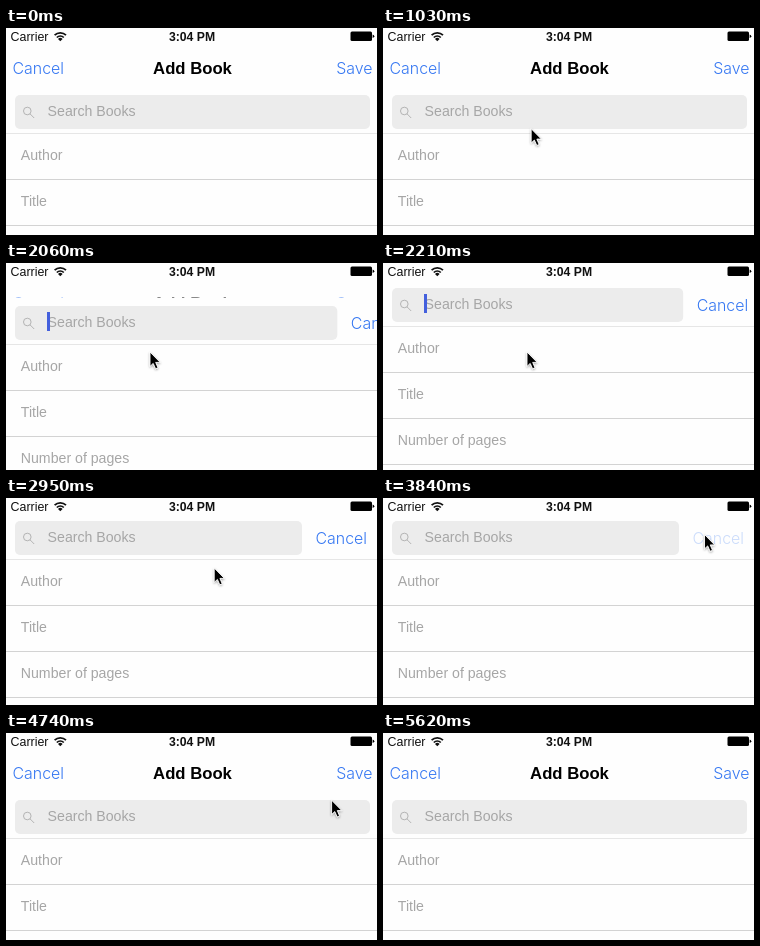
An HTML page that plays this animation: 371x207 px, repeating every 5890 ms.

```html
<!DOCTYPE html>
<html lang="en">
<head>
<meta charset="utf-8">
<title>Add Book</title>
<style>
html, body { margin: 0; width: 100%; height: 100%; overflow: hidden; background: #fefefe; }
svg { display: block; width: 371px; height: 207px; }
text { font-family: "Liberation Sans", Arial, sans-serif; font-size: 14.15px; fill: #a6a6a6; }
.status { font-size: 12.4px; fill: #111; }
.clock { font-size: 12.2px; font-weight: 700; fill: #111; }
.heading { font-size: 16.7px; font-weight: 700; fill: #000; }
.button { font-family: Inter, "Liberation Sans", sans-serif; font-size: 15.9px; font-weight: 300; fill: #3577f2; }
.soft { stroke: #e6e6e6; }
.rule { stroke: #d3d3d3; }
.icon { fill: none; stroke: #adadad; stroke-width: .9; }
.wifi { fill: none; stroke: #111; stroke-width: 1.7; }
</style>
</head>
<body>
<svg viewBox="0 0 371 207">
  <defs>
    <filter id="shade" x="-50%" y="-50%" width="200%" height="200%">
      <feDropShadow dx="0" dy="1" stdDeviation="0.8" flood-opacity="0.35"/>
    </filter>
  </defs>

  <g id="nav">
    <text class="button" x="6.5" y="46">Cancel</text>
    <text class="heading" x="186.5" y="46" text-anchor="middle">Add Book</text>
    <text class="button" x="366.5" y="46" text-anchor="end">Save</text>
    <path class="soft" d="M0 61.5H371"/>
  </g>

  <g id="sheet">
    <rect y="59" width="371" height="240" fill="#fefefe"/>
    <rect id="field" x="9" y="67" height="34" rx="5" fill="#ececec"/>
    <circle class="icon" cx="21.3" cy="83" r="3.8"/>
    <path class="icon" d="M24 85.8L28.2 90"/>
    <text x="41.6" y="88">Search Books</text>
    <rect id="caret" x="41" y="73" width="3" height="19" fill="#4460dd"/>
    <text id="cancel" class="button" y="90">Cancel</text>
    <path class="soft" d="M0 105.5H371"/>
    <text x="14.8" y="132">Author</text>
    <path class="rule" d="M0 151.5H371"/>
    <text x="14.8" y="178">Title</text>
    <path class="rule" d="M0 197.5H371"/>
    <text x="14.8" y="224">Number of pages</text>
    <path class="rule" d="M0 243.5H371"/>
  </g>

  <rect width="371" height="22" fill="#fefefe"/>
  <text class="status" x="4.6" y="13">Carrier</text>
  <g class="wifi">
    <path d="M48.6 7.2A8 8 0 0 1 60 7.2"/>
    <path d="M50.8 9.5A5 5 0 0 1 57.8 9.5"/>
  </g>
  <path d="M52 10.9A3.3 3.3 0 0 1 56.6 10.9L54.3 13.2Z" fill="#111"/>
  <text class="clock" x="186" y="13" text-anchor="middle">3:04 PM</text>
  <rect x="344.5" y="3.5" width="21.5" height="9.5" rx="1.5" fill="#000"/>
  <path d="M366.6 6.6V10Q368.3 9.6 368.3 8.3T366.6 6.6" fill="#000"/>

  <path id="cursor" d="M0 0V14.4L3.2 11.4L5.6 16.8L8 15.8L5.7 10.4H10.2Z"
        fill="#000" stroke="#fff" stroke-width=".9" filter="url(#shade)"/>
</svg>
<script>
const LOOP = 5890;
const STEP = 147.7; // the picture is refreshed once per step
const LEAD = 17;    // the sheet runs one screen refresh ahead of the field

const $ = id => document.getElementById(id);
const nav = $("nav"), sheet = $("sheet"), field = $("field");
const caret = $("caret"), cancel = $("cancel"), cursor = $("cursor");

const set = (el, attrs) => {
  for (const name in attrs) el.setAttribute(name, attrs[name]);
};
const ramp = (t, start, length) => Math.min(1, Math.max(0, (t - start) / length));
const smooth = u => (1 - Math.cos(Math.PI * u)) / 2;
const slow = power => u => 1 - (1 - u) ** power;

const searching = t => smooth(ramp(t, 1864, 418)) - smooth(ramp(t, 3860, 160));

// Pointer path: enter from below, reach the cancel button, leave below
const enter = { x: 174, y: 173 };
const moves = [
  { start: 590, length: 1030, x: 144, y: 89, ease: slow(3.5) },
  { start: 2650, length: 740, x: 321.5, y: 36.5, ease: smooth },
  { start: 4590, length: 880, x: 343, y: 198, ease: slow(1.25) }
];

function pointerAt(t) {
  let { x, y } = enter;
  for (const move of moves) {
    const u = move.ease(ramp(t, move.start, move.length));
    x += (move.x - x) * u;
    y += (move.y - y) * u;
  }
  return { x, y };
}

function draw(t) {
  const slide = searching(t + LEAD);
  const stretch = searching(t);
  const right = 364 - 68 * stretch;
  const focused = t > 1900 && t < 3690;
  const blinkOn = (t - 1900) % 1320 < 880;

  set(sheet, { transform: `translate(0 ${-Math.round(44 * slide)})` });
  set(nav, { opacity: slide < 0.1 ? 1 : 1 - slide });
  set(field, { width: right - 9 });
  set(cancel, { x: right + 13.5, opacity: t < 3690 ? 1 : 0.25 });
  set(caret, { opacity: focused && blinkOn ? 1 : 0 });

  const { x, y } = pointerAt(t);
  set(cursor, {
    transform: `translate(${x} ${y})`,
    opacity: t > 590 && t < 5600 ? 1 : 0
  });
}

const start = performance.now();
function tick() {
  const t = (performance.now() - start) % LOOP;
  draw(Math.floor((t + 9) / STEP) * STEP);
  requestAnimationFrame(tick);
}
tick();
</script>
</body>
</html>
```
